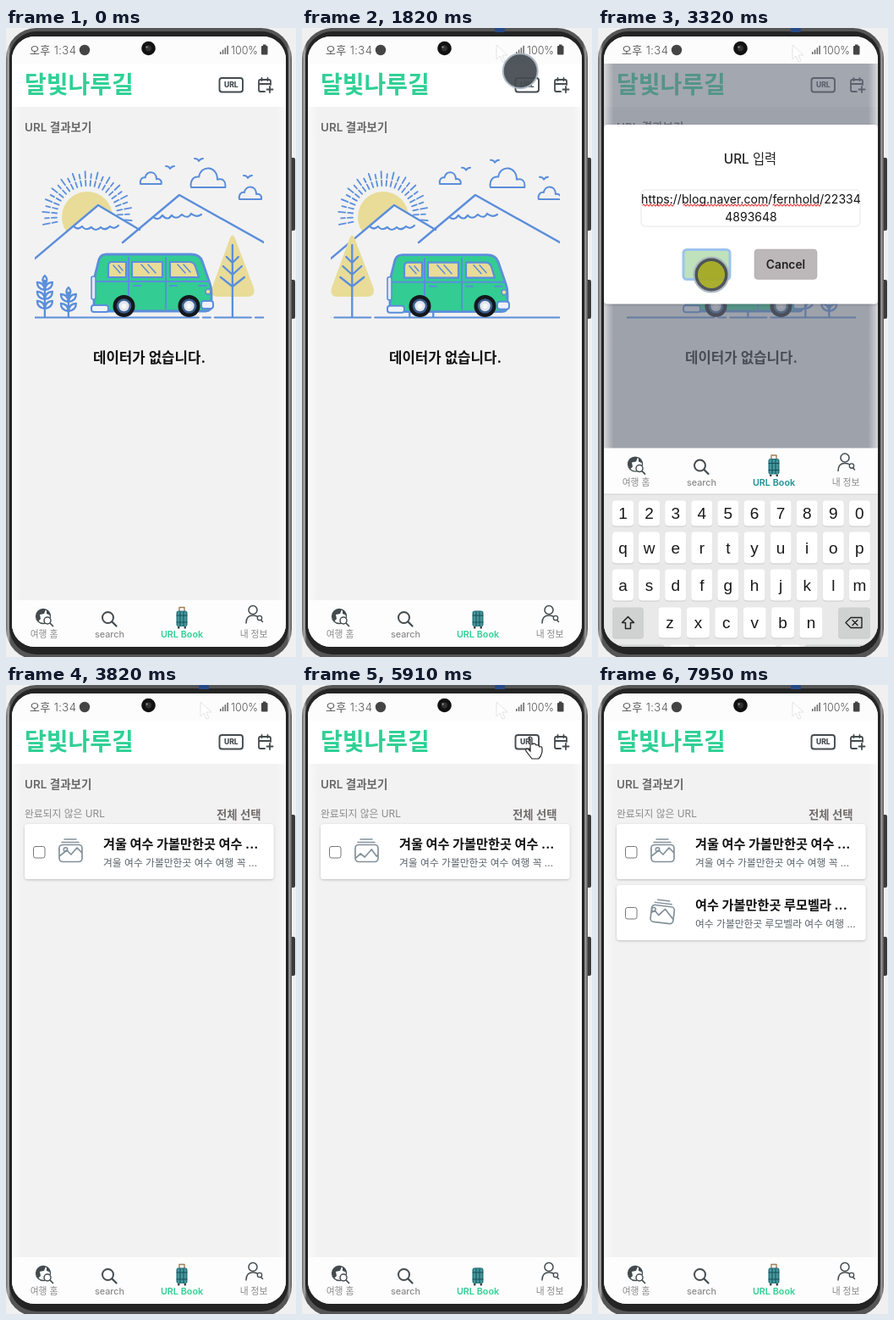
Animation, 343 px wide and 742 px high, one loop 7.99 s. Source, as an HTML page:

```html
<!DOCTYPE html>
<html lang="ko">
<head>
<meta charset="utf-8">
<title>URL Book</title>
<style>
html, body { margin: 0; width: 100%; height: 100%; overflow: hidden; background: #f0f0f0; }
svg { display: block; width: 343px; height: 742px; font-family: Inter, "Noto Sans CJK KR", "Noto Sans CJK JP", sans-serif; }
.keys { font-family: "Liberation Sans", Arial, sans-serif; }
.line { fill: none; stroke-linecap: round; stroke-linejoin: round; }
</style>
</head>
<body>
<svg id="stage" viewBox="0 0 343 742"></svg>
<script>
const LOOP = 7990, SCROLL = 290, SCENE_PERIOD = 2530, ICON_PERIOD = 1170;
const BLUE = '#5b8edb', GREEN = '#2fd095', SAND = '#e8dc98', PAGE = '#f2f2f2', INK = '#444b4f';

const range = n => [...Array(n).keys()];
const rect = (x, y, w, h, r, fill, more = '') =>
  `<rect x="${x}" y="${y}" width="${w}" height="${h}" rx="${r}" fill="${fill}" ${more}/>`;
const circle = (x, y, r, fill, more = '') => `<circle cx="${x}" cy="${y}" r="${r}" fill="${fill}" ${more}/>`;
const line = (d, color = BLUE, width = 2, more = '') =>
  `<path class="line" d="${d}" stroke="${color}" stroke-width="${width}" ${more}/>`;
const text = (x, y, size, str, fill, weight = 400, anchor = 'start', more = '') =>
  `<text x="${x}" y="${y}" font-size="${size}" font-weight="${weight}" fill="${fill}" text-anchor="${anchor}" ${more}>${str}</text>`;
const group = (id, body, more = '') => `<g id="${id}" ${more}>${body}</g>`;

// Travel scene
const rays = range(25).map(i => {
  const a = Math.PI * (0.94 + i / 22), c = Math.cos(a), s = Math.sin(a);
  const p = r => `${(96 + r * c).toFixed(1)} ${(222 + r * s).toFixed(1)}`;
  return `M${p(36)}L${p(42)}M${p(45)}L${p(i % 2 ? 50 : 53)}`;
}).join('');

const cloud = (x, y, k) => line(
  `M${x} ${y}h${26 * k}c1-${5 * k}-3-${7 * k}-${6 * k}-${6 * k}c0-${11 * k}-${13 * k}-${11 * k}-${14 * k}-${2 * k}c-${5 * k}-1-${7 * k} ${4 * k}-${6 * k} ${8 * k}z`);
const bird = (x, y) => line(`M${x - 5} ${y - 2}q4 0 5 3q2-3 5-3`);

const bush = (x, top) => {
  let d = `M${x} 341V${top + 6}`;
  for (let y = top + 13; y < 338; y += 11)
    for (const s of [-1, 1])
      d += `M${x} ${y + 4}q${s} -9 ${s * 9} -9q0 8 ${-s * 9} 9`;
  return line(d + `M${x} ${top + 10}q-5-5 0-10q5 5 0 10`, BLUE, 2.3);
};
const tree = `<path d="M265 248q3-7 6 0l22 58q3 11-7 11h-36q-9 0-6-11z" fill="${SAND}"/>` +
  line('M268 256V341M268 277l-7-7M268 277l7-7M268 291l-11-10M268 291l11-10M268 305l-14-11M268 305l14-11', BLUE, 2.3);
const roadside = tree + bush(46, 292) + bush(74, 306) +
  line('M34 341.5H228M233 341.5h9M247 341.5h43M295 341.5h28', BLUE, 2.2);

const wheel = x => circle(x, 328, 13, '#14171c') + circle(x, 328, 7.5, '#dfe6ee', 'stroke="#3d5f91" stroke-width="2.6"') +
  circle(x, 328, 3, '#f8f8f8');
const van = group('van',
  `<path d="M104 334V297L110 273q2-6 9-6h100q10 0 13 8l9 26q2 5 2 12v14q0 7-7 7z" fill="#33cc92" stroke="${BLUE}" stroke-width="2.8"/>` +
  line('M106 299H240M145 271v60M189 271v60M228 304h9M194 304h8M151 304h8') +
  `<g fill="${SAND}" stroke="${BLUE}" stroke-width="2.2"><path d="M125 276h17v18h-21v-13q0-5 4-5zM149 276h36v18h-36zM194 276h23q5 0 7 5l4 13h-34z"/></g>` +
  line('M127 280l8 9M133 280l5 6M160 279l9 10M168 279l9 10M203 279l9 10M210 279l8 9', BLUE, 1.5) +
  rect(101, 293, 5, 27, 2, '#dfe8f5', `stroke="${BLUE}" stroke-width="1.6"`) +
  rect(101, 327, 20, 8, 3, '#eef2f8', `stroke="${BLUE}" stroke-width="2"`) +
  rect(231, 322, 14, 9, 3, '#eef2f8', `stroke="${BLUE}" stroke-width="2"`) +
  circle(239, 311, 3, SAND, `stroke="${BLUE}" stroke-width="1.5"`)) + wheel(139.5) + wheel(216.5);

const scene = group('scene',
  circle(96, 223, 30, SAND) + line(rays, BLUE, 1.8) +
  `<path d="M34 272L109 209L160 239L205 197L305 253V344H34z" fill="${PAGE}"/>` +
  line('M34 272L109 209L158 238M138 253L205 197L305 253', BLUE, 2.4) +
  line('M80 234q5 5 10 0q4 6 11 1q5 6 11 0q5 5 11-1q5 4 10-1M174 223q6 5 11-2q6 7 11 0q5 6 12-1q7 6 11-1q6 5 12 1', BLUE, 2.2) +
  group('clouds', cloud(159, 184, 0.95) + cloud(219, 188, 1.55) + cloud(276, 202, 1)) +
  group('birds', bird(194, 165) + bird(228, 156) + bird(286, 176)) +
  range(3).map(() => `<g class="roadside">${roadside}</g>`).join('') + van, 'clip-path="url(#sceneClip)"');
const emptyPage = group('empty', scene + text(169.5, 394.5, 16.8, '데이터가 없습니다.', '#111', 700, 'middle'));

// Result list
const photoIcon = id => {
  const c = '#83919a';
  return group(id, line('M69 182h14M66 185.5h20', c, 1.5) +
    rect(63, 188.5, 27, 20, 4, 'none', `stroke="${c}" stroke-width="1.7"`) +
    `<g clip-path="url(#photoClip)"><g class="hills">${
      line('M35 207l9-8 5 4 8-9 6 8 9-7 5 5 7-8 11 11', c, 1.7)}${circle(70.5, 194, 2.3, 'none', `stroke="${c}" stroke-width="1.5"`)}</g></g>`);
};
const card = (id, y, title, note) => `<g id="${id}" transform="translate(0 ${y})">` +
  rect(22, 164, 294.5, 65, 4, '#fff', 'filter="url(#shadow)"') +
  rect(32.5, 190.5, 13.5, 13.5, 2.5, '#fff', 'stroke="#777"') + photoIcon(id + 'Icon') +
  text(115, 193, 15.2, title, '#111', 700) + text(115, 214, 11.8, note, '#59626a') + '</g>';
const results = group('results',
  text(22, 156, 11.8, '완료되지 않은 URL', '#8b8b8b') + text(249, 158, 13.4, '전체 선택', '#716d6d', 600) +
  card('card1', 0, '겨울 여수 가볼만한곳 여수 ...', '겨울 여수 가볼만한곳 여수 여행 꼭 ...') +
  card('card2', 72, '여수 가볼만한곳 루모벨라 ...', '여수 가볼만한곳 루모벨라 여수 여행 ...'));

// App chrome
const statusBar = rect(7, 10, 324, 32, 0, '#fcfcfc') + text(28, 31, 13, '오후 1:34', '#555', 300, 'start', 'letter-spacing=".4"') +
  circle(93, 26, 6.2, '#444') +
  range(4).map(i => rect(253 + i * 2.8, 28 - i * 2.4, 1.5, 3 + i * 2.4, 0, '#666')).join('') +
  text(266, 31, 12.5, '100%', '#555', 300) + rect(302, 21, 7.5, 10.5, 1, '#444') + rect(304, 19.5, 3.5, 2, 0, '#444') +
  circle(168.5, 24, 8.3, '#111') + circle(168.5, 24, 3.4, '#333') + circle(166.5, 22.5, 1.2, '#888');
const header = rect(7, 42, 324, 51, 0, '#fff') + text(22, 77, 28, '달빛나루길', GREEN, 700) +
  rect(252.5, 59, 27.5, 16.5, 3, 'none', `stroke="${INK}" stroke-width="1.9"`) +
  text(266.3, 70.3, 8.6, 'URL', INK, 800, 'middle') +
  line('M306 75h-5q-2 0-2-2V63q0-2 2-2h10q2 0 2 2v4M299 66h14M302.5 59v3M309.5 59v3M312 69v7M308.5 72.5h7', INK, 1.8) +
  text(22, 122, 13.5, 'URL 결과보기', '#686868', 600);

const label = (x, str, fill = '#8a8a8a', weight = 500, more = '') => text(x, 719, 10.8, str, fill, weight, 'middle', more);
const suitcase = group('handle', line('M205 689v-5.5h6v5.5', '#a07d55', 1.4)) +
  rect(201.5, 687.5, 13, 18.5, 2.5, '#27747e') +
  line('M204 689v16M208 689v16M212 689v16', '#63b5b0', 1.1) + line('M202 693h12M202 701h12', '#184c58', 1) +
  rect(203, 706, 2.5, 2.5, 1, '#333') + rect(210.5, 706, 2.5, 2.5, 1, '#333');
const nav = group('nav', rect(7, 675, 324, 55, 0, '#fdfdfd') +
  circle(44, 694, 8.5, '#fff', `stroke="${INK}" stroke-width="1.3"`) +
  `<path d="M36 690q5-6 11-4l-2 5-5 1 1 5-3 3q-3-4-2-10zM48 686q4 2 5 7l-5-2z" fill="${INK}"/>` +
  circle(49, 699, 4, '#fff', `stroke="${INK}" stroke-width="1.5"`) + line('M52 702l3.5 3.5', INK, 1.7) +
  circle(120.5, 695.5, 6.5, 'none', `stroke="${INK}" stroke-width="2"`) + line('M125.5 700.5l5 5', INK, 2.2) +
  suitcase +
  circle(292, 686.5, 5, 'none', `stroke="${INK}" stroke-width="1.5"`) +
  line('M284 702q0-9 8-9q3 0 5 1M301.5 698.5l2 2', INK, 1.5) + circle(300, 696, 2.7, 'none', `stroke="${INK}" stroke-width="1.3"`) +
  label(45, '여행 홈') + label(122.5, 'search') + label(208, 'URL Book', GREEN, 600, 'id="active"') + label(293, '내 정보'));

// Keyboard
const key = (x, y, w, h, str, fill = '#fff', size = 19) =>
  rect(x, y + 1, w, h, 4, '#c9c9c9') + rect(x, y, w, h, 4, fill) +
  text(x + w / 2, y + h / 2 + size * 0.36, size, str, '#181818', 400, 'middle');
const keyRow = (chars, x, pitch, y, w, h) => [...chars].map((c, i) => key(x + i * pitch, y, w, h, c)).join('');
const DARK = '#d0d1d1';
const keyboard = group('keyboard', rect(7, 486, 324, 250, 0, '#e9e9e9') + rect(7, 486, 324, 1, 0, '#d2d2d2') +
  keyRow('1234567890', 17, 31.1, 494, 25, 30) + keyRow('qwertyuiop', 17, 31.1, 531, 25, 37) +
  keyRow('asdfghjklm', 17, 31.1, 575, 25, 37) + key(17, 620, 37, 36, '', DARK) +
  keyRow('zxcvbn', 71.5, 33.4, 620, 27, 36) + key(284, 620, 38, 36, '', DARK) +
  line('M35.5 631l7 7h-4v7h-6v-7h-4z', '#222', 1.5) +
  line('M299 632h13v12h-13l-6-6zM301 635l6 6M307 635l-6 6', '#222', 1.4) +
  key(17, 664, 62, 36, '123', DARK, 15) + key(85, 664, 23, 36, ',', '#fff', 15) + key(114, 664, 97, 36, '') +
  text(161.5, 685, 14.5, 'space', '#181818', 400, 'middle') +
  key(216, 664, 23, 36, '.', '#fff', 15) + key(244, 664, 78, 36, 'return', DARK, 15), 'class="keys"');

// URL dialog
const wave = (x, end) => line(`M${x} 209` + range(Math.round((end - x) / 4)).map(() => 'q1-2 2 0q1 2 2 0').join(''), '#e33', 1.1);
const dialog = group('dialog', rect(7, 114, 324, 213, 4, '#fff', 'id="panel" filter="url(#shadow)"') +
  text(180, 160, 15.4, 'URL 입력', '#222', 500, 'middle') +
  rect(51, 191, 259, 44, 5, '#fff', 'id="field" stroke-width="1.5"') +
  group('placeholder', text(181, 207, 14.4, 'URL입력', '#9a9a9a', 400, 'middle') + rect(181, 194, 1, 17, 0, '#222', 'id="caret"')) +
  group('typed', text(181, 207, 14.1, 'https://blog.naver.com/fernhold/22334', '#111', 400, 'middle') +
    wave(53, 88) + wave(101, 199) + wave(207, 263) + text(181, 228, 14, '', '#111', 400, 'middle', 'id="rest"')) +
  group('buttons', rect(101, 263, 55, 35, 4, '#67cfa2', 'id="add" stroke-width="3"') +
    text(128.5, 285.5, 14, 'Add', '#fff', 700, 'middle', 'id="addLabel"') +
    rect(185, 262.5, 74, 35.5, 4, '#bcb7b8', 'stroke="#aaa5a6" stroke-width=".5"') +
    text(222, 285.5, 13.8, 'Cancel', '#222', 600, 'middle')));

const touch = group('touch', circle(0, 0, 20.5, '#444b50', 'stroke="#a9b5c1" stroke-width="2"') +
  circle(0, 0, 16, '#a5a920', 'id="press"'));
const hand = group('hand', '<path d="M-3-9q2.500-2 4 1v7q4-2 5 1 3-1 4 2 3-1 3 2v4q-1 5-4 8h-8l-7-9q-1-3 2-3l3 3V-7z" fill="#fff" stroke="#222" stroke-width="1.2"/>');
const ghost = group('ghost', '<path d="M230 20l13 12h-6l3 7-3 1-3-7-4 4z" fill="#fff" stroke="#ddd" stroke-width=".8"/>' + rect(228, 0, 12, 5, 1, '#274a87'));

const grad = (id, stops) => `<linearGradient id="${id}">${stops.map(([o, c, a]) =>
  `<stop offset="${o}" stop-color="${c}" stop-opacity="${a}"/>`).join('')}</linearGradient>`;
const edge = 0.035;
stage.innerHTML = `<defs>
  <clipPath id="screenClip">${rect(7, 10, 324, 720, 27, '#000')}</clipPath>
  <clipPath id="sceneClip">${rect(34, 153, 271, 191, 0, '#000')}</clipPath>
  <clipPath id="photoClip">${rect(63, 188, 27, 21, 4, '#000')}</clipPath>
  <filter id="shadow" x="-10%" y="-10%" width="120%" height="130%"><feDropShadow dx="0" dy="1" stdDeviation="1.5" flood-opacity=".22"/></filter>
  ${grad('edges', [[0, '#fff', 0.55], [edge, '#fff', 0], [1 - edge, '#fff', 0], [1, '#fff', 0.55]])}
  ${grad('metal', [[0, '#666', 1], [0.008, '#aaa', 1], [0.016, '#555', 1], [0.984, '#555', 1], [0.992, '#999', 1], [1, '#555', 1]])}</defs>` +
  rect(336, 153, 6, 86, 2, '#3a3a3a') + rect(336, 297, 6, 46, 2, '#3a3a3a') +
  rect(0, 0, 338, 745, 36, 'url(#metal)') + rect(4, 4, 330, 735, 32, '#242424') +
  group('screen', rect(7, 10, 324, 720, 0, PAGE) + statusBar + header + emptyPage + results +
    rect(7, 42, 324, 688, 0, '#6b7280', 'id="shade"') + rect(7, 42, 324, 688, 0, 'url(#edges)') +
    dialog + nav + keyboard + touch, 'clip-path="url(#screenClip)"') + hand + ghost;

// Motion
const $ = Object.fromEntries([...stage.querySelectorAll('[id]')].map(e => [e.id, e]));
const roads = stage.querySelectorAll('.roadside');
const set = (el, attrs) => { for (const k in attrs) el.setAttribute(k, attrs[k]); };
const show = (el, on) => { el.style.display = on ? '' : 'none'; };
const move = (el, x, y = 0) => set(el, { transform: `translate(${x} ${y})` });
const track = (t, ...keys) => {
  const i = keys.findIndex(k => k[0] > t);
  if (i === 0) return keys[0].slice(1);
  if (i < 0) return keys[keys.length - 1].slice(1);
  const a = keys[i - 1], b = keys[i], f = (t - a[0]) / (b[0] - a[0]);
  return a.slice(1).map((v, j) => v + (b[j + 1] - v) * f);
};

const visits = [
  { open: 1960, rise: 2000, paste: 2700, press: 3220, fall: 3270, close: 3560, rest: '4893648' },
  { open: 5990, rise: 6030, paste: 6580, press: 6900, fall: 6950, close: 7240, rest: '0127764' }
];
const LISTED = 3800, SECOND = 7450;

function drawScene(t) {
  const phase = t / SCENE_PERIOD, swing = (1 - Math.cos(phase * 2 * Math.PI)) / 2;
  roads.forEach((el, i) => move(el, (i - phase % 1) * SCROLL));
  move($.clouds, swing * 6.6);
  move($.birds, 0, swing * 3);
  move($.van, 0, 0.5 - 0.5 * Math.cos(phase * 12 * Math.PI));
}

function drawPhoto(el, age) {
  const p = (age % ICON_PERIOD) / ICON_PERIOD;
  const [tilt] = track(p, [0.25, 0], [0.43, 7], [0.53, 0]);
  const [slide] = track(p, [0, 0], [0.3, 0], [0.43, -5], [0.53, 0], [0.62, 0], [0.78, 25], [1, 27]);
  set(el, { transform: `rotate(${tilt} 76 196)` });
  move(el.querySelector('.hills'), slide);
}

function drawDialog(t) {
  const v = visits.find(v => t >= v.open && t < v.close);
  show($.dialog, v); show($.shade, v);
  set($.active, { fill: v ? '#1d8f96' : GREEN });
  if (!v) return;
  const [fade] = track(t, [v.open, 0], [v.open + 200, 1], [v.close - 150, 1], [v.close, 0]);
  set($.dialog, { opacity: fade });
  set($.shade, { opacity: fade * 0.62 });
  move($.dialog, 0, 12 * (1 - fade));
  const filled = t >= v.paste, pressed = t >= v.press;
  show($.typed, filled); show($.placeholder, !filled);
  show($.caret, (t - v.rise + 1000) % 1000 < 500);
  $.rest.textContent = v.rest;
  set($.field, { stroke: pressed ? '#eee' : '#222', height: filled ? 43 : 44 });
  set($.panel, { height: filled ? 211.5 : 213 });
  move($.buttons, 0, filled ? -1.5 : 0);
  set($.add, { fill: pressed ? '#bfe1bb' : '#67cfa2', stroke: pressed ? '#9cc3ee' : 'none' });
  show($.addLabel, !pressed);
}

function frame() {
  const t = performance.now() % LOOP;
  show($.empty, t < LISTED); show($.results, t >= LISTED); show($.card2, t >= SECOND);
  if (t < LISTED) drawScene(t);
  drawPhoto($.card1Icon, Math.max(0, t - LISTED));
  drawPhoto($.card2Icon, Math.max(0, t - SECOND));
  drawDialog(t);

  const lift = Math.max(...visits.map(v => track(t, [v.rise, 0], [v.rise + 195, 243], [v.fall, 243], [v.fall + 195, 0])[0]));
  move($.nav, 0, -lift);
  move($.keyboard, 0, 243 - lift);
  show($.keyboard, lift > 0);
  const [tuck] = track(t, [900, 0], [1200, 5], [2800, 5], [3150, 0], [4800, 0], [5050, 5], [6600, 5], [6900, 0]);
  move($.handle, 0, tuck);

  show($.touch, t >= 1700 && t < 3560);
  show($.press, (t >= 1910 && t < 2010) || t >= 3200);
  move($.touch, ...track(t, [1700, 234, 0], [1860, 266, 67], [2060, 266, 67], [2160, 252, 78], [2270, 223, 116], [2420, 184, 207], [2750, 182, 212], [3120, 134, 291]));
  set($.touch, { opacity: track(t, [3410, 0.93], [3560, 0])[0] });

  show($.hand, t >= 4760 && t < 7240);
  move($.hand, ...track(t, [4760, 350, 62], [4920, 280, 66], [5060, 271, 71], [6080, 271, 71], [6350, 182, 212], [6600, 182, 212], [6820, 130, 286]));
  show($.ghost, t >= 1760);
  requestAnimationFrame(frame);
}
frame();
</script>
</body>
</html>
```
